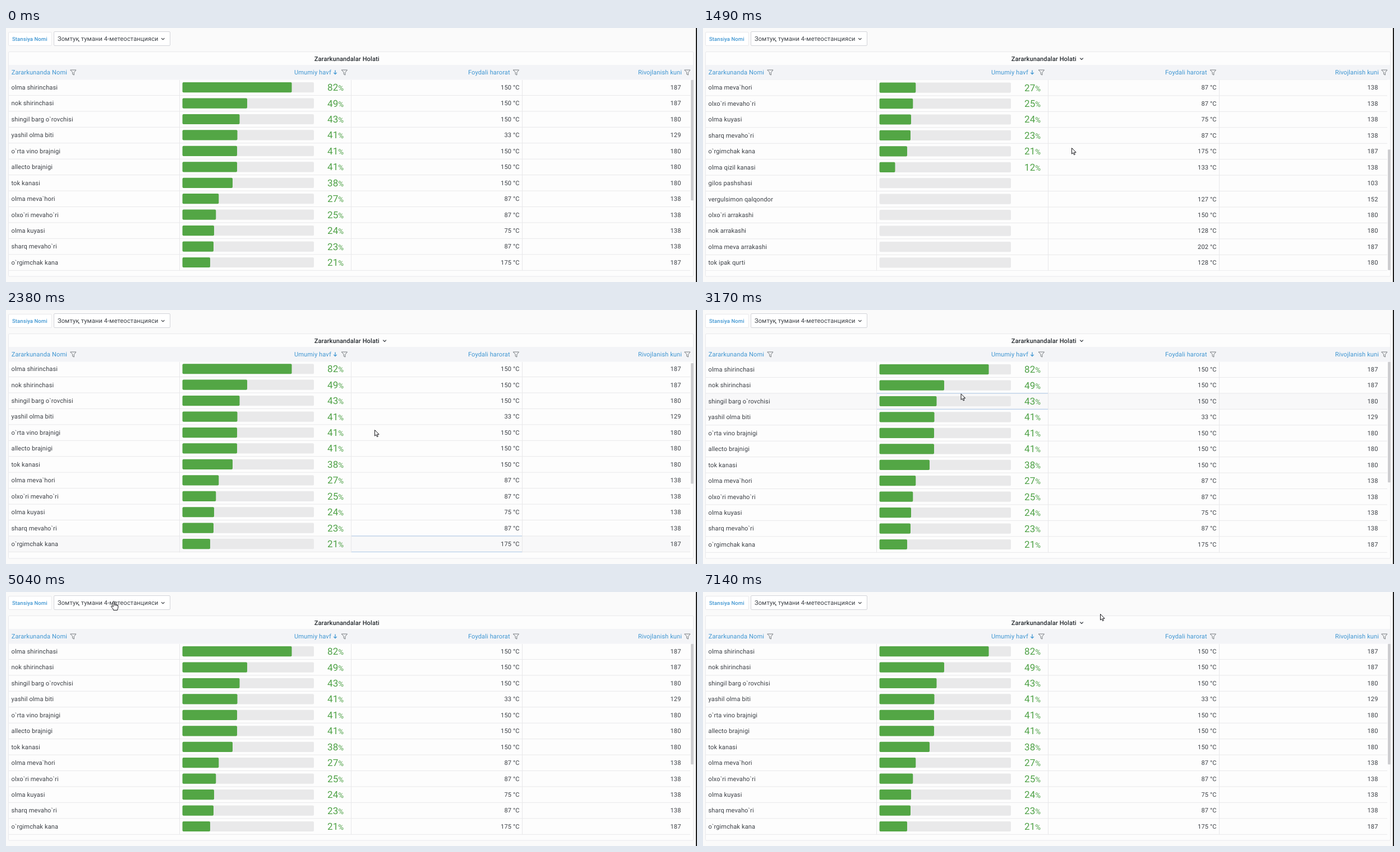
Animation, 1232 px wide and 454 px high, one loop 7190 ms. Source, as an HTML page:

```html
<!DOCTYPE html>
<html lang="uz">
<head>
<meta charset="utf-8">
<title>Zararkunandalar Holati</title>
<style>
  html, body { margin: 0; width: 100%; height: 100%; overflow: hidden; background: #fafafa; }
  svg { display: block; width: 100%; height: 100%; }
  text {
    font: 400 11.06px Roboto, Arial, sans-serif; letter-spacing: .0107em;
    fill: #3b3f45; text-rendering: geometricPrecision;
  }
  .label { font-size: 9.48px; font-weight: 500; fill: #3f96d2; }
  .title { font-weight: 500; fill: #24292e; }
  .head { fill: #3f96d2; }
  .value { font-size: 17px; letter-spacing: 0; fill: #4fa247; }
  .unit { font-size: 13.4px; }
  .icon { fill: none; stroke: #767b7e; stroke-width: 1; stroke-linejoin: round; stroke-linecap: round; }
  .strong { stroke: #45494e; stroke-width: 1.2; }
  .sort { stroke: #3f96d2; stroke-width: 1.3; }
  .line { stroke: #e8e8ea; stroke-width: 1; }
</style>
</head>
<body>
<svg id="stage" viewBox="0 0 1232 454" preserveAspectRatio="none">
  <defs>
    <clipPath id="body"><rect x="4" y="92.5" width="1217" height="341.5"/></clipPath>
  </defs>
</svg>
<script>
const LOOP = 7190, TOP = 92.3, ROW = 28.44, VIEW = 341.3;
const COLS = [5, 309.5, 615.5, 920.5, 1220];
const BAR = { x: 314.6, width: 234.4, pad: 4.74, height: 18.2 };

// name, percent, bar width, temperature, days
const ROWS = [
  ['olma shirinchasi', 82, 194.9, 150, 187],
  ['nok shirinchasi', 49, 115.4, 150, 187],
  ['shingil barg o`rovchisi', 43, 101.9, 150, 180],
  ['yashil olma biti', 41, 97.9, 33, 129],
  ['o`rta vino brajnigi', 41, 97.4, 150, 180],
  ['allecto brajnigi', 41, 97.4, 150, 180],
  ['tok kanasi', 38, 89.4, 150, 180],
  ['olma meva`hori', 27, 64.7, 87, 138],
  ['olxo`ri mevaho`ri', 25, 59.7, 87, 138],
  ['olma kuyasi', 24, 56.4, 75, 138],
  ['sharq mevaho`ri', 23, 55.4, 87, 138],
  ['o`rgimchak kana', 21, 49.4, 175, 187],
  ['olma qizil kanasi', 12, 27.9, 133, 138],
  ['gilos pashshasi', 0, 0, 0, 103],
  ['vergulsimon qalqondor', 0, 0, 127, 152],
  ['olxo`ri arrakashi', 0, 0, 150, 180],
  ['nok arrakashi', 0, 0, 128, 180],
  ['olma meva arrakashi', 0, 0, 202, 187],
  ['tok ipak qurti', 0, 0, 128, 180]
];
const MAX = ROWS.length * ROW - VIEW;
const THUMB = VIEW * VIEW / (ROWS.length * ROW);

const stage = document.getElementById('stage');

function add(tag, attrs, parent = stage, content) {
  const el = document.createElementNS('http://www.w3.org/2000/svg', tag);
  for (const k in attrs) el.setAttribute(k, attrs[k]);
  if (content !== undefined) el.textContent = content;
  parent.appendChild(el);
  return el;
}
const rect = (x, y, width, height, fill, more, parent) =>
  add('rect', { x, y, width, height, fill, ...more }, parent);
const line = (x1, y1, x2, y2, parent) =>
  add('line', { x1, y1, x2, y2, class: 'line' }, parent);
const label = (x, y, str, cls = '', anchor = 'start', parent) =>
  add('text', { x, y, class: cls, 'text-anchor': anchor }, parent, str);
const icon = (x, y, d, cls = '') =>
  add('path', { d, class: 'icon ' + cls, transform: `translate(${x} ${y})` });

// top controls
rect(4.5, 7.5, 77, 24, '#fff', { stroke: '#e9e9ec', rx: 1.5 });
label(11, 22.8, 'Stansiya Nomi', 'label');
rect(85.5, 6.5, 207, 25, '#fff', { stroke: '#d3d4d9', rx: 1.5 });
label(92, 23.4, 'Зомтуқ тумани 4-метеостанцияси');
icon(277, 18, 'M.5 .5L2.8 2.8L5.1 .5', 'strong');

// panel
rect(4.5, 42.5, 1221, 401.5, '#fdfdfd', { stroke: '#e9e9ec', rx: 1.5 });
label(549.7, 58.5, 'Zararkunandalar Holati', 'title');
const chevron = icon(672, 53.5, 'M.5 .5L3 3L5.5 .5', 'strong');
rect(5, 66, 1220, 26.5, '#f3f4f7');

const FUNNEL = 'M.5 .5H10.5L6.8 5V9.5L4.2 8.2V5Z';
[[9.7, 'Zararkunanda Nomi', 114.5], [514, 'Umumiy havf', 598],
 [824, 'Foydali harorat', 904], [1127, 'Rivojlanish kuni', 1209.5]]
  .forEach(([x, str, fx]) => {
    label(x, 83, str, 'head');
    icon(fx, 74.5, FUNNEL);
  });
icon(584, 75.5, 'M3 .5V7M.5 4.6L3 7.1L5.5 4.6', 'sort');

// table body
const clip = add('g', { 'clip-path': 'url(#body)' });
const table = add('g', {}, clip);
const hoverRow = rect(5, 0, 1215, ROW, '#f8f8f9', {}, table);
ROWS.forEach(([name, pct, bar, temp, days], i) => {
  const y = TOP + i * ROW, base = y + 17.7;
  const strip = (width, fill) =>
    rect(BAR.x, y + BAR.pad, width, BAR.height, fill, { rx: 2 }, table);
  label(9.5, base, name, '', 'start', table);
  strip(BAR.width, '#e9e9ea');
  if (pct) {
    strip(bar, '#53a645');
    const val = label(602, y + 19.8, pct, 'value', 'end', table);
    add('tspan', { class: 'unit' }, val, '%');
  }
  if (temp) label(915.5, base, temp + ' °C', '', 'end', table);
  label(1203.5, base, days, '', 'end', table);
  line(5, y + ROW - .3, 1220, y + ROW - .3, table);
});
COLS.slice(1, 4).forEach(x => line(x, 93, x, 433.5));
const hoverCell = rect(0, 0, 0, ROW, 'none', { stroke: '#adc9e8' }, table);
const thumb = rect(1221, 0, 5, THUMB, '#cdcdd0', { rx: 1 });
rect(1230, 0, 2, 454, '#1c1c1c');

// pointers
const ink = { fill: '#fff', stroke: '#16161a', 'stroke-width': 1, 'stroke-linejoin': 'round' };
const arrow = add('path', { d: 'M0 0V10.6L2.4 8.4L4 12.2L5.8 11.4L4.2 7.8H7.6Z', ...ink });
const hand = add('path', {
  d: 'M-1.3 .8Q0 -.8 1.3 .8V5.6Q2.6 4.6 3.6 6Q5 5.2 5.8 6.6Q7.6 6.2 7.6 8V11.4' +
     'Q7.4 13.4 6.4 14.6V16H-.8V14.8Q-3 12.2 -4.6 9.4Q-4.4 7.6 -2.6 8.6L-1.3 10Z' +
     'M1.3 5.6V8M3.6 6V8.2M5.8 6.6V8.6', ...ink
});

// time, x, y of the pointer tip
const PATH = [
  [250, 745, 470], [800, 711, 230], [950, 711, 230], [1250, 657.5, 214.5], [2700, 657.5, 214.5],
  [3900, 79, 25], [4400, 79, 25], [5600, 284.5, 9.5], [6050, 284.5, 9.5], [7140, 708.5, 39.5]
];
// start, end, from, to
const SCROLLS = [[900, 1545, 0, MAX], [1850, 2442, MAX, 0]];

const clamp = v => Math.max(0, Math.min(1, v));
const smooth = p => p * p * (3 - 2 * p);
const cubic = p => p < .5 ? 4 * p ** 3 : 1 - 4 * (1 - p) ** 3;

function pointer(t) {
  if (t < PATH[0][0]) return null;
  let i = 0;
  while (i < PATH.length - 2 && t >= PATH[i + 1][0]) i++;
  const [t0, x0, y0] = PATH[i], [t1, x1, y1] = PATH[i + 1];
  const p = smooth(clamp((t - t0) / (t1 - t0)));
  return [x0 + (x1 - x0) * p, y0 + (y1 - y0) * p];
}

function scrollAt(t) {
  let pos = 0;
  for (const [a, b, from, to] of SCROLLS)
    if (t >= a) pos = from + (to - from) * cubic(clamp((t - a) / (b - a)));
  return pos;
}

// the highlight trails the pointer and freezes while scrolling
function hovered(t) {
  for (const [a, b] of SCROLLS) if (t >= a && t < b + 60) t = a;
  const pos = pointer(t - 60);
  if (!pos) return null;
  const [x, y] = pos;
  if (y < TOP || y > TOP + VIEW || x < COLS[0] || x > COLS[4]) return null;
  return {
    row: Math.floor((y - TOP + scrollAt(t)) / ROW),
    col: COLS.findIndex((c, i) => x >= c && x < COLS[i + 1])
  };
}

const show = (el, on) => el.setAttribute('visibility', on ? 'visible' : 'hidden');

function draw(t) {
  table.setAttribute('transform', `translate(0 ${-scrollAt(t)})`);
  thumb.setAttribute('y', TOP + .5 + scrollAt(t - 35) / MAX * (VIEW - THUMB));

  const cell = hovered(t);
  show(hoverRow, cell);
  show(hoverCell, cell);
  if (cell) {
    const y = TOP + cell.row * ROW;
    hoverRow.setAttribute('y', y);
    hoverCell.setAttribute('y', y - .3);
    hoverCell.setAttribute('x', COLS[cell.col]);
    hoverCell.setAttribute('width', COLS[cell.col + 1] - COLS[cell.col]);
  }

  const pos = pointer(t);
  const [x, y] = pos || [0, 0];
  const onSelect = x > 85 && x < 293 && y > 6 && y < 32;
  show(arrow, pos && !onSelect);
  show(hand, pos && onSelect);
  for (const el of [arrow, hand]) el.setAttribute('transform', `translate(${x} ${y})`);
  show(chevron, pos && y > 38 && y < 444);
}

const start = performance.now();
function tick() {
  draw((performance.now() - start) % LOOP);
  requestAnimationFrame(tick);
}
tick();
</script>
</body>
</html>
```
